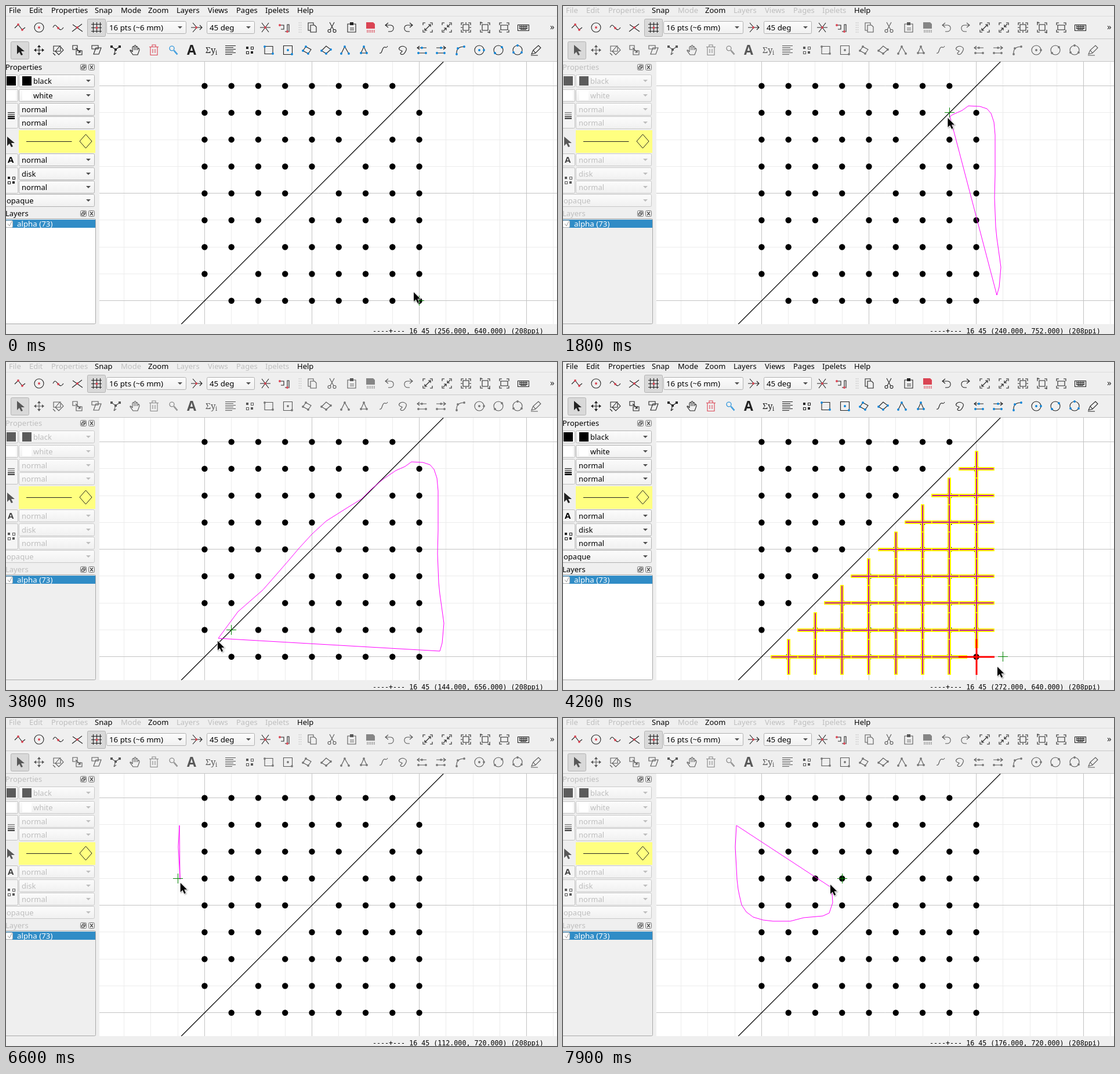
Animation, 950 px wide and 565 px high, one loop 8000 ms. Source, as an HTML page with a canvas:

```html
<!DOCTYPE html>
<html lang="en">
<head>
<meta charset="utf-8">
<title>Lasso selection on a grid</title>
<style>
html, body { margin: 0; width: 100%; height: 100%; overflow: hidden; background: #efefef; }
canvas { display: block; }
</style>
</head>
<body>
<canvas id="stage" width="950" height="565"></canvas>
<script>
const g = document.getElementById('stage').getContext('2d');
const SANS = '"Noto Sans", "Open Sans", sans-serif';
const MONO = '"DejaVu Sans Mono", monospace';
const LOOP = 8000, CELL = 46.27, X0 = 342.4, Y0 = 507.8;
const gx = i => X0 + i * CELL, gy = j => Y0 - j * CELL;
const INK = { k: ['#222', '#585858'], b: ['#0a84d8', '#777'], r: ['#da4453', '#858585'] };

// Icons: lower case strokes, upper case fills, "@" lists vertex dots.
const FRAME = 'k M-8 -4V-8H-4M4 -8H8V-4M8 4V8H4M-4 8H-8V4';
const CIRCLE = 'k M-8 0a8 8 0 1 0 16 0a8 8 0 1 0 -16 0';
const MARKS = 'K M-6 -6h4v4h-4zM2 2h4v4h-4z|k M2.5 -5.5h4v4h-4zM-5.5 2.5h4v4h-4z';
const ARROW = 'K M-5 -9V7L-1 3L2 9L5 8L2 2H8Z';
const snapIcons = [
  [24, 'k M-9 1L-3 -5L4 4L9 0|r@-3,-5 4,4'],
  [57, CIRCLE + '|r@0,0'],
  [90, 'k M-9 0C-5 -8 -3 -2 0 1S5 6 9 0|r@0,1'],
  [123, 'k M-9 7L8 -6M-8 -5L9 7|r@0,0'],
  [156, 'k M-5.5 -9V9M.5 -9V9M6.5 -9V9M-9 -5.5H9M-9 .5H9M-9 6.5H9|r@.5,.5'],
  [328, 'k M-9 0H10M-6 -8L1 0L-6 8M6 -4L10 0L6 4|r@0,0'],
  [447, 'k M-9 0H9M-6 -8L6 8M-6 8L6 -8|r@0,0'],
  [480, 'k M-8 -4H-1V3H-6M1 7H5V-5H8V8|r@-8,-4 5,7'],
];
const editIcons = [
  [528, 'k M-3 5H-7V-8H2V-4M-3 -4H4L7 -1V8H-3Z'],
  [562, 'k M-4 -9L3 4M4 -9L-3 4M-7 6a2.5 2.5 0 1 0 5 0a2.5 2.5 0 1 0 -5 0M2 6a2.5 2.5 0 1 0 5 0a2.5 2.5 0 1 0 -5 0'],
  [596, 'k M-7 -6H7V8H-7ZM-3 1H4M-3 4H4|K M-3 -9H3V-4H-3Z'],
  [628, 'R M-7 -9H5L8 -6V2H-7Z|r M-5 4V9M-2 4V9M1 4V9M4 4V9M7 4V9'],
  [661, 'k M-2 -8L-7 -4L-2 0M-7 -4H2C9 -4 9 7 1 7H-2'],
  [694, 'k M2 -8L7 -4L2 0M7 -4H-2C-9 -4 -9 7 -1 7H2'],
];
const zoomIcons = [
  [727, FRAME + '|k M-5 5L5 -5M1 -5H5V-1M-5 1V5H-1'],
  [760, FRAME + '|k M-6 6L-1 1M-5 1H-1V5M6 -6L1 -1M1 -5V-1H5'],
  [793, FRAME + '|k M-5 -5H5V5H-5ZM0 -9V-6M0 6V9M-9 0H-6M6 0H9'],
  [826, FRAME + '|k M-5 -5H5V5H-5ZM-9 -9H-6M6 9H9'],
  [859, FRAME + '|k M-6 -4H6V4H-6Z'],
  [892, 'k M-9.5 -4.5H9.5V5.5H-9.5ZM-7 -1.5H7M-7 1.5H7M-5 3.5H5M-6 -4V3M-3 -4V3M0 -4V3M3 -4V3M6 -4V3'],
];
const toolIcons = [
  [24, ARROW],
  [57, 'k M-8 0H8M0 -8V8|K M-9 0l4 -3v6zM9 0l-4 -3v6zM0 -9l-3 4h6zM0 9l-3 -4h6z'],
  [90, 'k M-8 -7H4V2H-8ZM-5 2L3 -7L9 0L1 8ZM-9 5L-5 9'],
  [123, 'k M-8 -8H0V-1H-8ZM-2 1H8V8H-2ZM-3 -4L5 4M1 4H5V0'],
  [156, 'k M-8 -8H3V-2H-8ZM-5 7L-1 -4H8L4 7Z'],
  [189, 'k M-7 -6L0 -1L7 -6M0 -1L-3 8M-3 8L1 5|K M-9 -8h4v4h-4zM5 -8h4v4h-4zM-2 -3h4v4h-4z'],
  [222, 'k M-4 3V-5Q-3 -8 -1 -5V-7Q1 -10 2 -7V-5Q5 -8 5 -4V-2Q8 -5 8 0L5 8H-3L-8 1Q-8 -2 -4 3M-1 -5V0M2 -5V0M5 -3V0'],
  [255, 'r M-8 -5.5H8M-3 -6V-9H3V-6M-6 -5V8.5H6V-5M-2 -2V5M2 -2V5'],
  [288, 'b M-6 -3a4 4 0 1 0 8 0a4 4 0 1 0 -8 0M1 1L7 8M2 0L8 7'],
  [387, 'k M-9 -7.5H9M-9 -4.5H5M-9 -1.5H9M-9 1.5H5M-9 4.5H9M-9 7.5H3'],
  [420, MARKS],
  [453, 'k M-7 -6.5H7V6.5H-7Z|b@-7,-6 7,6'],
  [486, 'k M-7.5 -7.5H7.5V7.5H-7.5Z|b@0,0 7,7'],
  [519, 'k M-7 1L-2 -6L7 -1L2 6Z|b@-7,1 -2,-6 2,6'],
  [552, 'k M-8 1L0 -7L8 -1L0 6Z|b@-8,1 0,6 8,-1'],
  [585, 'k M-7 6L-1 -6L6 6|b@-7,6 -1,-6 6,6'],
  [617, 'k M-5 5L0 -6L5 5Z|b@-5,5 0,-6 5,5'],
  [651, 'k M-7 5C-2 7 -3 -4 1 -5S4 -2 7 -7'],
  [684, 'k M-5 -5C0 -9 8 -5 6 0S1 9 -3 7S2 2 -2 1S-8 -2 -5 -5'],
  [717, 'k M-8 -4H8M-4 -7L-8 -4L-4 -1M-5 5H7|b@-6,5 0,-4 7,5'],
  [750, 'k M-8 -4H8M4 -7L8 -4L4 -1M-7 5H5|b@-7,5 0,-4 6,5'],
  [783, 'k M-6 7C-7 -2 -2 -6 7 -6|b@-6,7 -4,-3 7,-6'],
  [816, CIRCLE + '|b@0,0 8,0'],
  [849, CIRCLE + '|b@-6,5 6,-5'],
  [882, CIRCLE + '|b@-7,4 0,-8 7,4'],
  [914, 'k M-8 7L-5 0L4 -8L8 -4L-1 5ZM-5 0L-1 5M-9 9H3'],
];

// Each stage moves along pts; keys are [time, position along pts, cursor lead].
const stages = [
  { from: 0, pts: [[703, 493], [735, 499]], keys: [[0, 0, 0], [100, 1, 0]] },
  { from: 200, lasso: true,
    pts: [[748, 498], [752, 484], [755, 450], [750, 414], [748, 400], [746, 380], [744, 330],
      [745, 290], [745, 222], [743, 200], [738, 185], [731, 177], [719, 173], [699, 172],
      [688, 180], [672, 187], [650, 202], [630, 219], [613, 236], [590, 250], [552, 274],
      [528, 296], [505, 321], [488, 341], [468, 364], [443, 392.5], [400, 430], [366, 476],
      [355, 520], [400, 541], [580, 544], [742, 530]],
    keys: [[400, 0, 0], [900, 4, .8], [1300, 8, .25], [2200, 21, .1], [2600, 25, .1],
      [3600, 25, .1], [3800, 27, .1], [4000, 27, .1], [4100, 31, 0]] },
  { from: 4200, picked: true, pts: [[749, 525], [383, 240], [330, 219], [299, 186]],
    keys: [[4400, 0, 0], [5300, 1, 0], [5700, 2, 0], [5900, 3, 0]] },
  { from: 6000, lasso: true,
    pts: [[299, 185], [297, 222], [299, 258], [300, 278], [302, 295], [304, 305], [308, 322],
      [316, 334], [328, 343], [345, 348], [362, 350], [392, 350], [415, 344], [448, 341],
      [459, 336], [465, 318], [464, 303], [461, 291], [461, 287]],
    keys: [[6200, 0, 0], [6600, 3, .35], [6700, 3, .35], [7600, 13, .3], [7900, 17, 1]] },
];

const mix = (a, b, f) => a.map((v, i) => v + (b[i] - v) * f);

function pointAt(pts, u) {
  const i = Math.min(Math.floor(u), pts.length - 1);
  return mix(pts[i], pts[i + 1] || pts[i], u - i);
}

function keyAt(keys, t) {
  const n = keys.findIndex(k => k[0] > t);
  if (n === 0) return keys[0];
  if (n < 0) return keys[keys.length - 1];
  const a = keys[n - 1], b = keys[n];
  return mix(a, b, (t - a[0]) / (b[0] - a[0]));
}

function rect(x, y, w, h, color) {
  g.fillStyle = color;
  g.fillRect(x, y, w, h);
}

function line(x1, y1, x2, y2, color, width = 1) {
  g.strokeStyle = color;
  g.lineWidth = width;
  g.beginPath();
  g.moveTo(x1, y1);
  g.lineTo(x2, y2);
  g.stroke();
}

function text(s, x, y, color = '#000', font = '13px ' + SANS) {
  g.font = font;
  g.fillStyle = color;
  g.fillText(s, x, y);
}

function disc(x, y, r, color) {
  g.fillStyle = color;
  g.beginPath();
  g.arc(x, y, r, 0, 7);
  g.fill();
}

function box(x, y, w, h, fill, border = '#b3b3b3') {
  g.beginPath();
  g.roundRect(x + .5, y + .5, w - 1, h - 1, 2);
  g.fillStyle = fill;
  g.fill();
  g.strokeStyle = border;
  g.lineWidth = 1;
  g.stroke();
}

function icon(x, y, spec, dim) {
  g.save();
  g.translate(x, y);
  g.lineWidth = 1.1;
  for (const part of spec.split('|')) {
    const key = part[0], color = INK[key.toLowerCase()][+dim];
    g.fillStyle = g.strokeStyle = color;
    if (part[1] === '@') {
      for (const p of part.slice(2).split(' ')) disc(...p.split(',').map(Number), 1.9, color);
    } else {
      const path = new Path2D(part.slice(2));
      if (key < 'a') g.fill(path); else g.stroke(path);
    }
  }
  g.restore();
}

function combo(x, y, w, h, label, dim, swatch, size = 13) {
  const shade = g.createLinearGradient(0, y, 0, y + h);
  shade.addColorStop(0, '#fcfcfc');
  shade.addColorStop(1, '#f0f0f0');
  box(x, y, w, h, shade, dim ? '#c8c8c8' : '#b0b0b0');
  if (swatch) rect(x + 6, y + 3, 16, 16, swatch);
  text(label, x + (swatch ? 25 : 5), y + h / 2 + 4.5, dim ? '#bebebe' : '#000', size + 'px ' + SANS);
  g.fillStyle = dim ? '#bebebe' : '#505050';
  g.fill(new Path2D(`M${x + w - 15} ${y + h / 2 - 2}h8l-4 4z`));
}

function panelTitle(label, y, dim) {
  text(label, -1, y + 5, dim ? '#bebebe' : '#000');
  for (const x of [128, 142]) box(x, y - 5, 11, 11, '#efefef', '#777');
  g.strokeStyle = '#444';
  g.lineWidth = 1.2;
  g.stroke(new Path2D(`M130.5 ${y}h4v3.5h-4zM132.5 ${y}v-2.5h4v4h-2M145 ${y - 2.5}l5 6m0 -6l-5 6`));
}

function toolbars(dim) {
  const menu = { File: 5, Edit: 40, Properties: 78, Snap: 153, Mode: 198, Zoom: 245,
    Layers: 294, Views: 348, Pages: 397, Ipelets: 447, Help: 502 };
  for (const [name, x] of Object.entries(menu))
    text(name, x, 12, dim && !/Snap|Zoom|Help/.test(name) ? '#bebebe' : '#000');
  line(0, 17.5, 950, 17.5, '#dcdcdc');
  line(0, 56.5, 950, 56.5, '#c8c8c8');
  line(0, 95.5, 950, 95.5, '#c4c4c4');
  box(140, 22, 32, 31, '#d9d9d9');
  box(8, 61, 32, 31, '#d9d9d9');
  combo(173, 26, 138, 22, '16 pts (~6 mm)', false, null, 13.3);
  combo(346, 26, 83, 22, '45 deg', false, null, 13.3);
  for (let y = 28; y < 48; y += 4) for (const x of [505, 508]) rect(x, y, 1, 2, '#c0c0c0');
  for (const [x, spec] of [...snapIcons, ...zoomIcons]) icon(x, 37, spec, false);
  for (const [x, spec] of editIcons) icon(x, 37, spec, dim);
  for (const [x, spec] of toolIcons) icon(x, 76, spec, dim);
  const ink = INK.k[+dim];
  text('A', 312, 84, ink, 'bold 23px ' + SANS);
  text('Σy', 344, 81, ink, '15px "Noto Serif", serif');
  text('i', 361, 84, ink, '10px "Noto Serif", serif');
  text('»', 938, 41, '#222', '15px ' + SANS);
}

function sidePanel(dim) {
  const black = dim ? '#5c5c5c' : '#000', button = '#f5f5f5';
  panelTitle('Properties', 105, dim);
  for (const [y, h] of [[118, 22], [143, 22], [167, 44], [254, 22], [278, 45]])
    box(-4, y, 25, h, button, '#c0c0c0');
  rect(1, 121, 16, 16, black);
  rect(1, 146, 16, 16, '#fff');
  [1, 1, 2, 3].forEach((h, i) => rect(3, 183 + i * 3, 12, h, black));
  icon(7, 234, ARROW, dim);
  text('A', 3, 270, dim ? '#444' : '#000', 'bold 15px ' + SANS);
  icon(9, 300, MARKS, dim);
  combo(22, 118, 131, 22, 'black', dim, black);
  combo(22, 143, 131, 22, 'white', dim, '#fff');
  combo(22, 167, 131, 22, 'normal', dim);
  combo(22, 190, 131, 22, 'normal', dim);
  rect(22, 214, 132, 39, '#ffff80');
  line(35, 233.5, 113.5, 233.5, '#222');
  g.stroke(new Path2D('M127 233L137.5 221L148 233L137.5 245Z'));
  combo(22, 254, 131, 22, 'normal', dim);
  combo(22, 278, 131, 22, 'disk', dim);
  combo(22, 301, 131, 22, 'normal', dim);
  combo(-4, 324, 157, 22, 'opaque', dim);
  panelTitle('Layers', 357, dim);
  box(-4, 366, 159, 182, dim ? '#efefef' : '#fff', '#a8a8a8');
  rect(0, 368, 154, 14, '#308cc6');
  box(-1, 369, 13, 13, '#fff', '#b0b0b0');
  g.strokeStyle = '#999';
  g.stroke(new Path2D('M3 375l3 4l4 -8'));
  text('alpha (73)', 19, 379.5, '#fff', '13.3px ' + SANS);
}

function pickedMark(x, y, primary) {
  const bar = (r, w, color) => {
    rect(x - r, y - w / 2, 2 * r, w, color);
    rect(x - w / 2, y - r, w, 2 * r, color);
  };
  if (primary) return bar(31, 3, '#f00');
  const arm = (r, w, vertical, color) => vertical
    ? rect(x - w / 2, y - r, w, 2 * r, color) : rect(x - r, y - w / 2, 2 * r, w, color);
  for (const vertical of [false, true]) arm(31, 6, vertical, '#ff0');
  for (const vertical of [false, true]) arm(29.5, 2, vertical, '#c0179c');
}

function drawing(picked) {
  rect(161, 96, 789, 452, '#fff');
  for (const major of [false, true]) {
    const color = major ? '#c3c3c3' : '#ececec';
    for (let i = -3; i <= 13; i++) {
      if ((i % 4 === 0) !== major) continue;
      const x = Math.floor(gx(i)) + .5, y = Math.floor(gy(i)) + .5;
      line(x, 96, x, 548, color);
      if (i >= 0 && i < 9) line(161, y, 950, y, color);
    }
  }
  line(X0 + Y0 - 548, 548, X0 + Y0 - 96, 96, '#000', 1.2);
  for (let j = 8; j >= 0; j--) for (let i = 0; i < 9; i++) {
    if (i === j) continue;
    disc(gx(i), gy(j), 5.2, '#000');
    if (picked && i > j) pickedMark(Math.round(gx(i)), Math.round(gy(j)), i === 8 && j === 0);
  }
}

function lassoLine(pts, u, end) {
  g.strokeStyle = '#f0f';
  g.lineWidth = 1;
  g.beginPath();
  for (const [x, y] of [...pts.slice(0, Math.floor(u) + 1), end]) g.lineTo(x, y);
  g.closePath();
  g.stroke();
}

function cursor(x, y) {
  g.save();
  g.translate(x, y);
  const arrow = new Path2D('M0 0V16L3.8 12.6L6.6 18.8L9.2 17.6L6.5 11.6H11.5Z');
  g.lineJoin = 'round';
  g.shadowColor = 'rgba(0,0,0,.35)';
  g.shadowBlur = 2;
  g.shadowOffsetX = g.shadowOffsetY = 1;
  g.strokeStyle = '#fff';
  g.lineWidth = 1.6;
  g.stroke(arrow);
  g.shadowColor = 'transparent';
  g.fillStyle = '#000';
  g.fill(arrow);
  g.restore();
}

function draw(now) {
  const t = Math.floor(now % LOOP / 100) * 100;
  const { pts, keys, lasso = false, picked } = stages.findLast(s => t >= s.from);
  const [, u, lead] = keyAt(keys, t);
  const end = pointAt(pts, u);
  // The snap cross does not follow until the first drag begins.
  const [i, j] = t < 500 ? [8, 0]
    : [Math.round((end[0] - X0) / CELL), Math.round((Y0 - end[1] + 1) / CELL)];

  rect(0, 0, 950, 565, '#efefef');
  toolbars(lasso);
  sidePanel(lasso);
  g.save();
  g.beginPath();
  g.rect(161, 96, 789, 452);
  g.clip();
  drawing(picked);
  if (lasso) lassoLine(pts, u, end);
  const x = Math.floor(gx(i)) + .5, y = Math.floor(gy(j)) + .5;
  line(x - 8.5, y, x + 8.5, y, '#008000');
  line(x, y - 8.5, x, y + 8.5, '#008000');
  g.restore();
  const place = `(${(128 + 16 * i).toFixed(3)}, ${(640 + 16 * j).toFixed(3)})`;
  text(`----+--- 16 45 ${place} (208ppi)`, 632, 564, '#000', '11.67px ' + MONO);
  cursor(...pointAt(pts, u + lead));
}

function tick() {
  draw(performance.now());
  requestAnimationFrame(tick);
}
tick();
</script>
</body>
</html>
```
